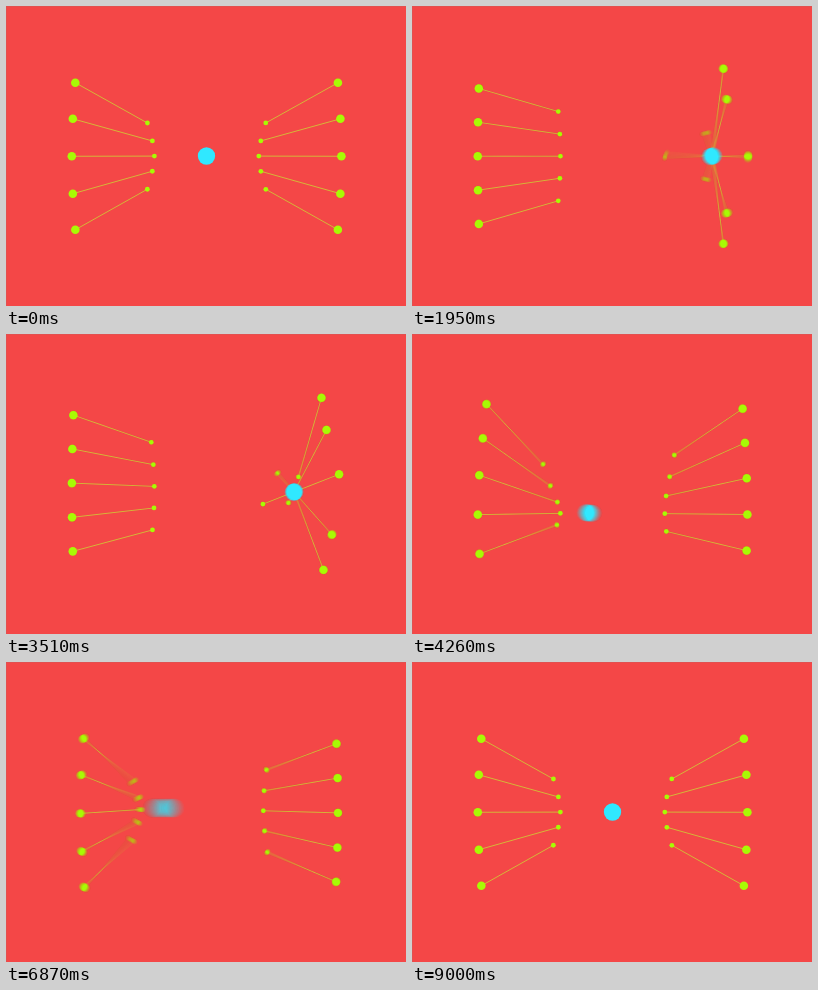
Animation of 400x300 px, one loop 9030 ms. Source, as an HTML page with a canvas:

```html
<!DOCTYPE html>
<html lang="en">
<head>
<meta charset="utf-8">
<title>Rods following a ball</title>
<style>
html, body { margin: 0; width: 100%; height: 100%; overflow: hidden; background: #f44747; }
canvas { display: block; width: 400px; height: 300px; }
</style>
</head>
<body>
<canvas id="stage" width="400" height="300"></canvas>
<script>
const W = 400, H = 300, LOOP = 9030, STEP = 30;
const CX = 200.6, CY = 150.2, CAMERA = 555;
const SHUTTER = 30, SAMPLES = 18;
const RED = '#f44747', LIME = '#a8fa04', CYAN = '#30e8ff', LINE = '#d6b638';
const TAIL = 27.6, HEAD = 55;

const key = (t, x, y, z = 0) => ({ t, x, y, z });
const rest = (...args) => ({ ...key(...args), still: true });

// Turning points of the ball on screen; z is its height towards the viewer.
const path = [
  rest(0, 200.5, 150),
  key(900, 88, 160, 20),
  key(1170, 96.5, 197, 29),
  key(2050, 312, 148, -5),
  key(2520, 205, 188, -8),
  key(2730, 259, 173, -12),
  key(2900, 316, 150),
  key(4100, 236, 172),
  key(4260, 177, 179),
  key(4450, 138, 165),
  key(5050, 93, 122),
  rest(5640, 130, 135),
  rest(6700, 11, 148, 44),
  key(6870, 158, 146, 48),
  key(7100, 311, 147, 38),
  key(8400, 240, 142),
  rest(9000, 200.5, 150)
];

function slope(i, axis) {
  if (path[i].still) return 0;
  const a = path[i - 1], b = path[i + 1];
  return (b[axis] - a[axis]) / (b.t - a.t);
}

// Smooth curve through the turning points, in space coordinates.
function ballAt(time) {
  const t = Math.max(0, Math.min(9000, time));
  let i = 0;
  while (i < path.length - 2 && path[i + 1].t <= t) i++;
  const a = path[i], b = path[i + 1], span = b.t - a.t;
  const u = (t - a.t) / span, v = 1 - u;
  const at = axis =>
    v * v * (1 + 2 * u) * a[axis] + u * u * (1 + 2 * v) * b[axis] +
    span * u * v * (v * slope(i, axis) - u * slope(i + 1, axis));
  const z = at('z'), s = CAMERA / (CAMERA - z);
  return { x: (at('x') - CX) / s, y: (at('y') - CY) / s, z };
}

const stage = document.getElementById('stage').getContext('2d');
const layer = document.createElement('canvas');
layer.width = W;
layer.height = H;
const ctx = layer.getContext('2d');

function project(p) {
  const s = CAMERA / (CAMERA - p.z);
  return { x: CX + p.x * s, y: CY + p.y * s, s };
}

function dot(p, radius, color) {
  ctx.fillStyle = color;
  ctx.beginPath();
  ctx.arc(p.x, p.y, radius * p.s, 0, Math.PI * 2);
  ctx.fill();
}

// Each rod turns in space about its pivot so that its head faces the ball.
function rod(x, y, ball) {
  const dx = ball.x - x, dy = ball.y - y;
  const d = Math.hypot(dx, dy, ball.z) || 1;
  const along = n => project({ x: x + dx / d * n, y: y + dy / d * n, z: ball.z / d * n });
  const tail = along(-TAIL), head = along(HEAD);
  ctx.strokeStyle = LINE;
  ctx.lineWidth = 1;
  ctx.beginPath();
  ctx.moveTo(tail.x, tail.y);
  ctx.lineTo(head.x, head.y);
  ctx.stroke();
  dot(tail, 4.3, LIME);
  dot(head, 2.4, LIME);
}

function drawScene(time) {
  const ball = ballAt(time);
  ctx.fillStyle = RED;
  ctx.fillRect(0, 0, W, H);
  ctx.fillStyle = '#e2504f';
  ctx.fillRect(0, 0, W, 1);
  ctx.fillRect(0, 0, 1, H);
  for (const side of [-1, 1])
    for (let i = -2; i <= 2; i++) rod(side * 107.2, i * 30, ball);
  dot(project(ball), 8.7, CYAN);
}

// Averages several moments inside the open shutter.
function render(time) {
  for (let i = 0; i < SAMPLES; i++) {
    drawScene(time + ((i + 0.5) / SAMPLES - 0.5) * SHUTTER);
    stage.globalAlpha = 1 / (i + 1);
    stage.drawImage(layer, 0, 0);
  }
}

let last = -1;
const start = performance.now();
function tick() {
  const t = (performance.now() - start) % LOOP;
  const time = Math.floor(t / STEP) * STEP;
  if (time !== last) render(last = time);
  requestAnimationFrame(tick);
}
tick();
</script>
</body>
</html>
```
